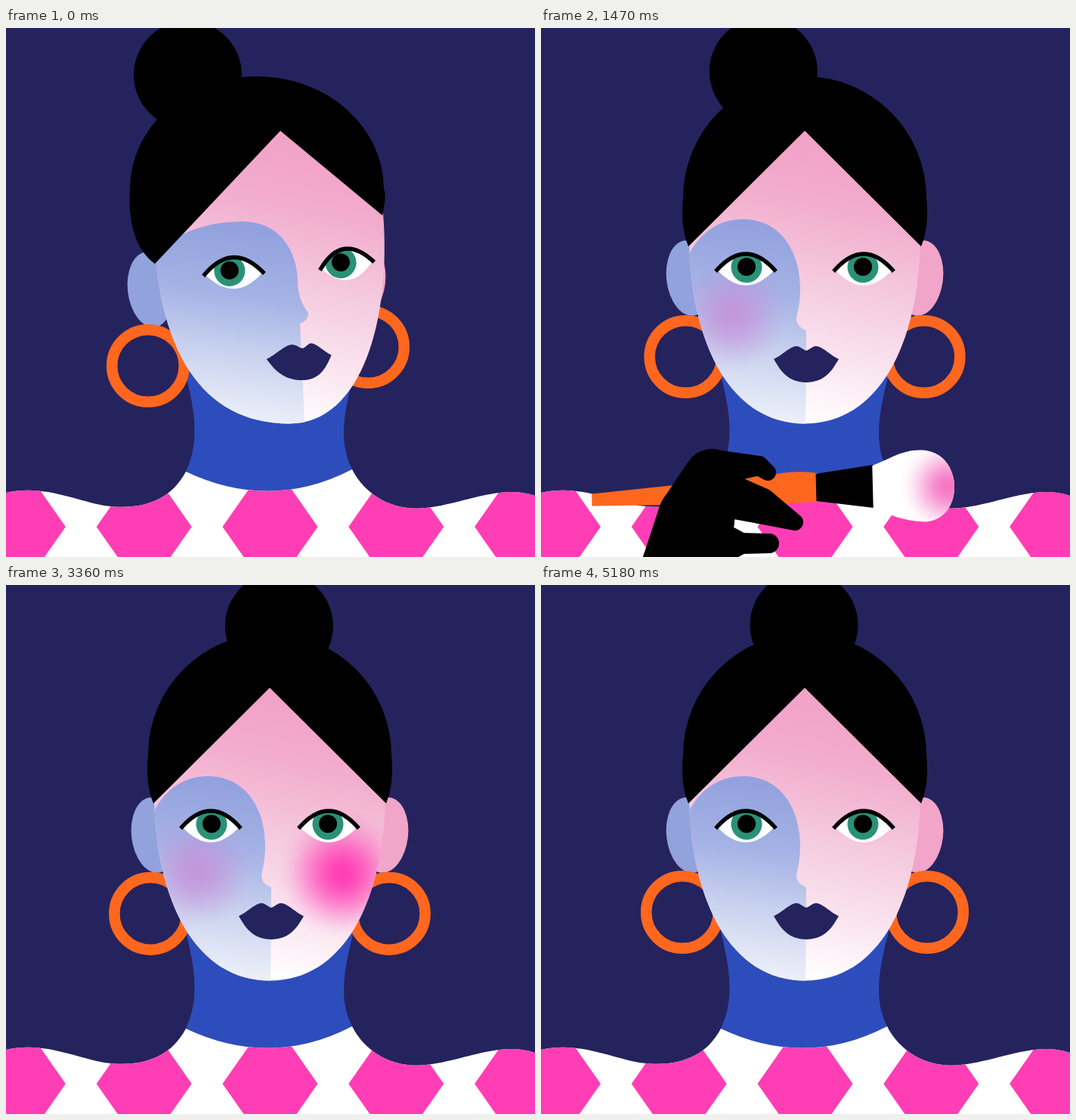
Recreate the animation shown at these times as an HTML page with a canvas. Size 700 by 700 pixels, loop 5.25 s.

```html
<!DOCTYPE html>
<html lang="en">
<head>
<meta charset="utf-8">
<title>Blush</title>
<style>
html, body { margin: 0; width: 100%; height: 100%; overflow: hidden; background: #25235d; }
canvas { display: block; width: 100vw; height: 100vh; }
</style>
</head>
<body>
<canvas id="stage" width="700" height="700"></canvas>
<script>
const ctx = document.getElementById('stage').getContext('2d');
const LOOP = 5250, STEP = 70, AXIS = 698, TAU = Math.PI * 2;
const NAVY = '#25235d', ORANGE = '#ff671f', PINK = '#ff3eb5', BLUE = '#2e4dbc';

// Smooth step from 0 to 1 between two times
function ramp(t, from, to) {
  const p = Math.min(1, Math.max(0, (t - from) / (to - from)));
  return p * p * (3 - 2 * p);
}
// Wave from 0 to 1 and back, 0 at time zero
const wave = (t, period) => (1 - Math.cos(TAU * t / period)) / 2;

// Left-side value for a turn k: 1 is turned right, 0 front, -1 left.
// The right side is the mirror image with -k.
const at = (k, near, front, far) => front + (k > 0 ? near - front : front - far) * k;

function fill(color, draw) {
  ctx.beginPath();
  draw();
  ctx.fillStyle = color;
  ctx.fill();
}
function disc(x, y, r, color) {
  fill(color, () => ctx.arc(x, y, r, 0, TAU));
}
function scene(draw, x = 0, y = 0, angle = 0, side = 1) {
  ctx.save();
  ctx.translate(x, y);
  ctx.scale(side, 1);
  ctx.rotate(angle);
  draw();
  ctx.restore();
}
function bothSides(draw) {
  for (const side of [1, -1]) scene(() => draw(side), side > 0 ? 0 : AXIS, 0, 0, side);
}
function gradient(x, y, u, v, stops) {
  const g = ctx.createLinearGradient(x, y, u, v);
  stops.forEach(([p, c]) => g.addColorStop(p, c));
  return g;
}
function glow(x, y, r, rgb, alpha) {
  const g = ctx.createRadialGradient(x, y, 0, x, y, r);
  for (let p = 0; p <= 1; p += .125) {
    g.addColorStop(p, `rgba(${rgb},${alpha * (1 - p * p * (3 - 2 * p))})`);
  }
  disc(x, y, r, g);
}
// Tapered black limb through joints [x, y, radius]
function limb(...joints) {
  for (let i = 1; i < joints.length; i++) {
    const [x, y, r] = joints[i - 1], [u, v, q] = joints[i];
    const a = Math.atan2(v - y, u - x), b = Math.acos((r - q) / Math.hypot(u - x, v - y));
    fill('#000', () => {
      ctx.arc(x, y, r, a + b, a - b + TAU);
      ctx.arc(u, v, q, a - b, a + b);
    });
  }
}

function body() {
  fill(BLUE, () => {
    ctx.moveTo(230, 430);
    ctx.bezierCurveTo(250, 500, 258, 545, 238, 587);
    ctx.quadraticCurveTo(350, 655, 458, 584);
    ctx.bezierCurveTo(438, 545, 448, 500, 468, 430);
  });
  ctx.save();
  ctx.beginPath();
  ctx.moveTo(0, 615);
  ctx.bezierCurveTo(50, 604, 90, 625, 130, 632);
  ctx.bezierCurveTo(180, 639, 218, 625, 238, 587);
  ctx.quadraticCurveTo(350, 640, 458, 584);
  ctx.bezierCurveTo(476, 620, 515, 640, 555, 635);
  ctx.bezierCurveTo(605, 630, 655, 603, 700, 619);
  ctx.lineTo(700, 700);
  ctx.lineTo(0, 700);
  ctx.clip();
  ctx.fillStyle = '#fff';
  ctx.fillRect(0, 560, 700, 140);
  for (let i = -2; i <= 2; i++) {
    const x = 349.5 + i * 166.8;
    fill(PINK, () => {
      for (const s of [-1, 1]) {
        ctx.lineTo(x + 21 * s, 660 + 60 * s);
        ctx.lineTo(x - 21 * s, 660 + 60 * s);
        ctx.lineTo(x - 63 * s, 660);
      }
    });
  }
  ctx.restore();
}

function bun(k, tilt) {
  disc(348 - 107.5 * k, 53 + 9 * Math.abs(k) + 18 * tilt, 71.5, '#000');
}

function ears(k, tilt, swing) {
  bothSides(side => {
    const s = k * side;
    fill(side > 0 ? '#92a2dd' : '#f1a5c8', () => ctx.ellipse(
      at(s, 191, 196, 226), at(s, 346, 331, 335) + 7 * tilt, 30, 50, -.12, 0, TAU));
  });
  bothSides(side => {
    const s = k * side;
    const x = at(s, 193, 187, 214) + 10 * swing - 5 * Math.abs(k) * side;
    const y = at(s, 447, 433, 422) + 4.5 * swing + 7 * tilt;
    ctx.beginPath();
    ctx.arc(x, y, 47.8, 0, TAU);
    ctx.strokeStyle = ORANGE;
    ctx.lineWidth = 14.5;
    ctx.stroke();
  });
}

// Temple, two controls and chin of one half of the face
function jaw(k) {
  return [
    [at(k, 197, 196, 199), at(k, 290, 280, 245)],
    [at(k, 205, 198, 188), at(k, 420, 420, 385)],
    [at(k, 255, 252, 227), 523.5],
    [349 + 26 * k, 523.5]
  ];
}

function profile(k) {
  const sx = 194, tx = at(k, 313, 267, 243), ty = at(k, 256, 253, 247);
  const px = at(k, 386, 343, 307), py = at(k, 335, 342, 318);
  const nx = at(k, 400, 338, 296), ny = at(k, 377, 383, 380);
  const ux = at(k, 389, 351, 308), uy = at(k, 391, 400, 392);
  ctx.moveTo(sx, 303);
  ctx.bezierCurveTo(sx + (tx - sx) * .22, ty + 16, tx - (tx - sx) * .4, ty, tx, ty);
  ctx.bezierCurveTo(tx + (px - tx) * .66, ty, px - 1, (ty + py) / 2 - 2, px, py);
  ctx.quadraticCurveTo(px, py + (ny - py) * .58, nx, ny);
  ctx.quadraticCurveTo(nx, (ny + uy) / 2 + 4, ux, uy);
  ctx.lineTo(350 + 46 * k, 540);
  ctx.lineTo(150, 540);
  ctx.lineTo(150, 303);
}

function face(k, tilt, rouge) {
  ctx.save();
  ctx.translate(0, -3 * tilt);
  ctx.beginPath();
  const l = jaw(k), r = jaw(-k).map(([x, y]) => [AXIS - x, y]);
  ctx.moveTo(349 + 14 * k, 118);
  ctx.lineTo(...l[0]);
  ctx.bezierCurveTo(...l[1], ...l[2], ...l[3]);
  ctx.bezierCurveTo(...r[2], ...r[1], ...r[0]);
  ctx.closePath();
  ctx.fillStyle = gradient(400, 170, 325, 515,
    [[0, '#f2a3c8'], [.2, '#f2adce'], [.5, '#f5cce0'], [.75, '#fae4ef'], [1, '#fff']]);
  ctx.fill();
  ctx.clip();
  fill(gradient(290, 255, 255, 530,
    [[0, '#91a0de'], [.35, '#a6b3e5'], [.65, '#ccd5f0'], [.95, '#eef1fa']]), () => profile(k));
  bothSides(side => {
    const x = at(k * side, 283, 253, 234);
    if (side > 0) glow(x, 380, 80, '200,138,215', .75 * rouge.left);
    else glow(x, 382, 88, '255,62,181', rouge.right);
  });
  ctx.restore();
}

function eye(k, tilt) {
  const w = at(k, 38.5, 38, 34.5);
  scene(() => {
    const lid = () => {
      ctx.beginPath();
      ctx.moveTo(-w, 0);
      ctx.quadraticCurveTo(0, -42, w, 0);
    };
    ctx.save();
    lid();
    ctx.quadraticCurveTo(0, 41, -w, 0);
    ctx.fillStyle = '#fff';
    ctx.fill();
    ctx.clip();
    disc(1 - 6.5 * k, -3.5, 20.5, '#2a9177');
    disc(1 - 6.5 * k, -4, 12, '#000');
    ctx.restore();
    lid();
    ctx.strokeStyle = '#000';
    ctx.lineWidth = 5.5;
    ctx.lineCap = 'square';
    ctx.stroke();
  }, at(k, 301.5, 271, 247), at(k, 324.5, 320, 313) - tilt, at(k, -.04, 0, .15));
}

function mouth(k, tilt) {
  scene(() => {
    ctx.scale(1 - .07 * tilt, 1 + .14 * tilt);
    for (const side of [-1, 1]) {
      ctx.save();
      ctx.scale(side * (1 - .14 * k * side), 1);
      fill(NAVY, () => {
        ctx.moveTo(-1, 0);
        ctx.bezierCurveTo(4, 0, 7, -6, 13, -6);
        ctx.bezierCurveTo(21, -6, 33, 7, 43, 11);
        ctx.bezierCurveTo(35, 25, 25, 42, -1, 42);
      });
      ctx.restore();
    }
    if (tilt > .02) fill('#000', () => ctx.ellipse(-2, 17, 16 * tilt, 6 * tilt, 0, 0, TAU));
  }, 351 + 42 * k, 427 - 3 * Math.abs(k) - 4 * tilt, -.06 * k);
}

function hair(k, tilt) {
  const turn = Math.abs(k), cx = 349 - 17 * k, cy = 225 - 12 * turn, rx = 161 + 7 * turn;
  const tip = s => [at(s, 197, 195, 200), at(s, 312, 289, 248) + 4 * tilt];
  const [lx, ly] = tip(k), [rx2, ry2] = tip(-k);
  fill('#000', () => {
    ctx.moveTo(349 + 14 * k, 136 - 7 * tilt);
    ctx.lineTo(lx, ly);
    ctx.quadraticCurveTo(cx - rx - 4, ly - 27, cx - rx, cy);
    ctx.ellipse(cx, cy, rx, cy - 64, 0, Math.PI, TAU);
    ctx.quadraticCurveTo(cx + rx + 4, ry2 - 27, AXIS - rx2, ry2);
  });
}

function head(t) {
  const turn = s => 1 - ramp(s, 1200, 1470) - ramp(s, 1560, 1830) + ramp(s, 2960, 3300);
  const k = turn(t), tilt = ramp(t, 3480, 3780) - ramp(t, 4580, 4900);
  const shake = (start, end) => (1 - .7 * wave(t - end, 467)) *
    ramp(t, start, start + 400) * (1 - ramp(t, end + 350, end + 800));
  const swing = shake(100, 700 + 467) + shake(1750, 2800);
  const rouge = {
    left: ramp(t, 380, 1000) * (1 - ramp(t, 4060, 4420)),
    right: ramp(t, 2080, 2750) * (1 - ramp(t, 4560, 4860))
  };
  bun(turn(t - 135), tilt);
  ears(k, tilt, swing);
  face(k, tilt, rouge);
  bothSides(side => eye(k * side, tilt));
  mouth(k, tilt);
  hair(k, tilt);
}

// Points along +x, with the origin where handle and ferrule meet
function brush(tint) {
  fill(ORANGE, () => {
    ctx.moveTo(2, -19);
    ctx.quadraticCurveTo(-24, -24, -60, -18);
    ctx.lineTo(-297, 1);
    ctx.lineTo(-297, 17);
    ctx.lineTo(-34, 20);
    ctx.lineTo(2, 19);
  });
  fill('#000', () => {
    ctx.moveTo(0, -18);
    ctx.lineTo(76, -28);
    ctx.lineTo(76, 29);
    ctx.lineTo(0, 18);
  });
  ctx.save();
  ctx.beginPath();
  ctx.moveTo(75, -27);
  ctx.bezierCurveTo(100, -36, 115, -47, 140, -46);
  ctx.bezierCurveTo(197, -44, 197, 48, 143, 49);
  ctx.bezierCurveTo(115, 48, 95, 38, 75, 29);
  ctx.fillStyle = '#fff';
  ctx.fill();
  ctx.clip();
  glow(174, 3, 64, '246,118,196', tint);
  ctx.restore();
}

function grip() {
  limb([-70, -37, 7], [-120, -23, 17], [-155, 20, 34]);
  limb([-10, 5, 9], [-52, 4, 23], [-105, 22, 32]);
  limb([-20, 46, 12], [-60, 60, 16], [-105, 75, 28]);
  limb([-130, 40, 57], [-115, 120, 48], [-95, 180, 51], [-105, 225, 52], [-150, 420, 80], [-180, 600, 90]);
}
function fist() {
  limb([185, 800, 60], [190, 715, 57], [205, 650, 51], [226, 594, 37]);
  limb([230, 582, 24], [288, 579, 13], [300, 588, 11]);
  limb([225, 612, 32], [290, 632, 24], [336, 654, 11]);
  limb([215, 682, 38], [265, 682, 14], [302, 682, 13]);
}
function palm() {
  limb([298, 464, 15], [350, 550, 27]);
  limb([248, 461, 15], [305, 540, 27]);
  limb([237, 488, 14], [290, 570, 27]);
  limb([241, 549, 11], [285, 615, 20]);
  limb([322, 570, 44], [334, 597, 62], [358, 640, 70], [398, 700, 66], [480, 850, 66]);
}

// Stroke the cheek between two times, drawn back at the end of each stroke
function dab(t, start, end, { x, y, angle, wrist, side, tint }) {
  if (t < start || t > end + 250) return;
  const reach = wave(t - end, 467), away = 1 - ramp(t, start, start + 250) + ramp(t, end, end + 250);
  scene(() => {
    brush(tint);
    ctx.rotate(-wrist);
    grip();
  }, x + side * (57 * reach - 340 * away), y + 12 * reach + 90 * away, angle + .05 * reach - .1 * away, side);
}

function carry(t) {
  if (t < 1260 || t > 1850) return;
  const before = 1 - ramp(t, 1260, 1470), after = ramp(t, 1500, 1850);
  scene(() => {
    scene(() => brush(1), 364, 608, -.025);
    fist();
  }, 640 * (after - before), 120 * before + 160 * after);
}

function wipe(t) {
  if (t < 3500 || t > 5040) return;
  const below = 1 - ramp(t, 3500, 3780), gone = ramp(t, 4860, 5040);
  scene(() => {
    disc(261, 469, 80, '#fff');
    palm();
  }, 205 * ramp(t, 4400, 4680) + 140 * below + 180 * gone,
  420 * (below + gone) - 70 * wave(t - 4130, 350));
}

function frame() {
  const t = Math.floor(performance.now() % LOOP / STEP) * STEP;
  ctx.fillStyle = NAVY;
  ctx.fillRect(0, 0, 700, 700);
  body();
  head(t);
  dab(t, 70, 1167, { x: 52, y: 339, angle: .01, wrist: .16, side: 1, tint: 1 });
  carry(t);
  dab(t, 1850, 2800, { x: 598, y: 343, angle: .22, wrist: .27, side: -1, tint: 1 - .4 * ramp(t, 2100, 2800) });
  wipe(t);
  requestAnimationFrame(frame);
}
frame();
</script>
</body>
</html>
```
